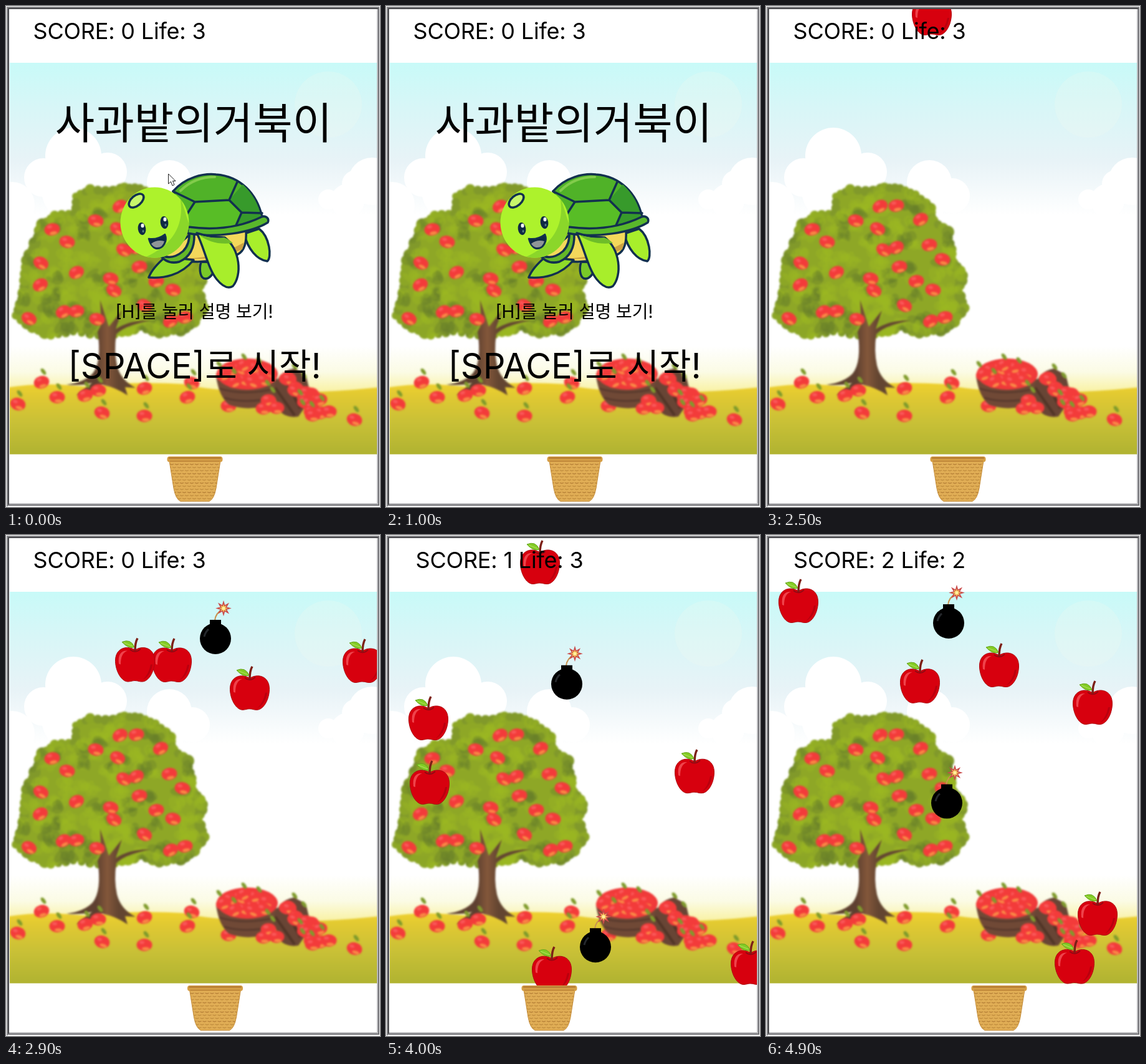
These frames come from a looping animation (600x803 px, 5000 ms). An HTML page with a canvas:

```html
<!DOCTYPE html>
<html lang="ko">
<head>
<meta charset="utf-8">
<title>사과밭의거북이</title>
<style>
html, body { margin: 0; width: 100%; height: 100%; overflow: hidden; background: #fff; }
canvas, svg { position: absolute; left: 0; top: 0; width: 600px; height: 803px; }
text { font-family: Inter, "Noto Sans CJK KR", "Noto Sans CJK", sans-serif; text-anchor: middle; fill: #000; }
.big { font-size: 69px; }
.start { font-size: 56px; }
.small { font-size: 28px; }
#score { font-size: 36px; letter-spacing: -0.2px; }
</style>
</head>
<body>
<canvas id="stage" width="600" height="803"></canvas>
<svg viewBox="0 0 600 803">
  <text id="score" x="182" y="53"></text>
  <g id="title">
    <text class="big" x="301" y="213">사과밭의거북이</text>
    <text class="small" x="302" y="500">[H]를 눌러 설명 보기!</text>
  </g>
  <g id="help">
    <text class="big" x="302" y="242">게임설명!</text>
    <text class="small" x="302" y="449">방향키를 움직여 바구니에 사과를 담으세요!</text>
    <text class="small" x="302" y="489">실수로 폭탄을 담으면 LIFE가 깎여요!</text>
    <text class="small" x="302" y="530">거북이가 당신을 구해줄거예요!</text>
  </g>
  <text id="start" class="start" x="302.5" y="597">[SPACE]로 시작!</text>
</svg>
<script>
const LOOP = 5000, STEP = 100, HELP = 1400, PLAY = 2400;
const $ = id => document.getElementById(id);
const ctx = $('stage').getContext('2d');

// [ms, game ticks]: the game slows as it goes on
const TICKS = [[2500, 0], [3300, 47.25], [4000, 85.4], [5000, 127.8]];
const BASKET = [[2400, 303], [2500, 308], [3300, 363], [4000, 262], [4900, 374], [5000, 386]];
// draw, x, ms and y of a known place, speed per tick, ms when caught
const DROPS = [
  [apple, 266, 3300, 354, 8, 4100],
  [bomb, 336, 3300, 297, 8, 4200],
  [apple, 207, 3300, 448, 12],
  [apple, 572, 3300, 544, 16],
  [apple, 391, 3300, 635, 18, 3400],
  [bomb, 290, 3300, -10, 5],
  [apple, 495, 3300, 38, 8],
  [apple, 68, 4000, 258, 15],
  [apple, 70, 4000, 361, 14],
  [apple, 585, 4000, 650, 20],
  [apple, 247, 4000, 8, 5],
  [apple, 52, 4900, 70, 8],
  [bomb, 293, 4900, 83, 8],
  [apple, 374, 4900, 173, 10],
  [apple, 524, 4900, 233, 11],
  [apple, 532, 4900, 571, 18]
];

function track(keys, t) {
  if (t >= PLAY && t < keys[0][0]) {
    const [a, b] = keys;
    return a[1] + (t - a[0]) * (b[1] - a[1]) / (b[0] - a[0]);
  }
  if (t <= keys[0][0]) return keys[0][1];
  const i = keys.findIndex(k => k[0] >= t), a = keys[i - 1], b = keys[i];
  return a[1] + (t - a[0]) * (b[1] - a[1]) / (b[0] - a[0]);
}

function seeded(s) {
  return () => (s = (s * 16807) % 2147483647) / 2147483647;
}

function layer(draw) {
  const c = document.createElement('canvas');
  c.width = 600; c.height = 803;
  draw(c.getContext('2d'));
  return c;
}

function oval(g, x, y, rx, ry, fill, rot = 0) {
  g.fillStyle = fill;
  g.beginPath();
  g.ellipse(x, y, rx, ry, rot, 0, 7);
  g.fill();
}

function shape(g, d, fill, line, width) {
  const p = new Path2D(d);
  if (fill) { g.fillStyle = fill; g.fill(p); }
  if (line) { g.strokeStyle = line; g.lineWidth = width; g.stroke(p); }
}

function fade(g, y0, y1, ...stops) {
  const f = g.createLinearGradient(0, y0, 0, y1);
  stops.forEach(([at, c]) => f.addColorStop(at, c));
  return f;
}

function fruit(g, x, y, tilt = 0) {
  oval(g, x, y, 12.5, 10, '#f33b3a', tilt);
  oval(g, x + 2, y + 6, 6, 2.5, '#f98a45', tilt);
  oval(g, x - 4, y - 4, 4, 2.5, '#f9585a', tilt);
}

function leaf(g, x, y) {
  oval(g, x, y, 6, 3, '#7f9a2c', 0.9);
}

const EDGE = [[112, 305], [135, 294], [172, 298], [190, 291], [215, 292], [240, 302], [264, 324], [268, 344], [292, 362],
  [297, 390], [300, 412], [316, 432], [308, 456], [318, 484], [302, 506], [280, 520], [246, 524], [215, 514], [186, 524],
  [148, 528], [108, 522], [72, 528], [42, 516], [16, 496], [27, 470], [30, 440], [33, 408], [46, 380], [58, 350], [78, 336], [112, 333]];
const TREE_FRUIT = [[183, 321], [209, 320], [144, 344], [179, 357], [248, 342], [74, 358], [98, 378], [189, 391], [209, 387],
  [262, 383], [283, 406], [56, 412], [113, 427], [214, 418], [168, 437], [173, 456], [55, 447], [241, 441], [268, 455],
  [37, 501], [92, 490], [113, 489], [146, 502], [222, 480], [264, 505], [287, 499]];
const FALLEN = [[57, 603], [82, 627], [19, 638], [127, 624], [148, 616], [154, 652], [222, 613], [222, 657], [298, 604], [291, 627], [357, 641], [559, 663]];

function tree(g) {
  const rnd = seeded(77);
  g.fillStyle = '#8ea726';
  g.beginPath();
  EDGE.forEach(p => g.lineTo(...p));
  g.fill();
  EDGE.forEach(([x, y], i) => {
    const [u, v] = EDGE[(i + 1) % EDGE.length];
    for (let k = 0; k < 3; k++) {
      const m = k / 3, r = 6 + rnd() * 4;
      oval(g, x + (u - x) * m, y + (v - y) * m, r, r, rnd() < 0.5 ? '#8ca626' : '#81992a');
    }
  });
  g.globalCompositeOperation = 'source-atop';
  for (let i = 0; i < 150; i++) {
    const x = 15 + rnd() * 300, y = 290 + rnd() * 240;
    const dark = rnd() < 0.33;
    for (let k = 0; k < 4; k++)
      oval(g, x + rnd() * 20, y + rnd() * 14, 5 + rnd() * 8, 4 + rnd() * 5, dark ? 'rgba(103,125,40,.38)' : 'rgba(155,184,32,.38)', rnd() * 3);
  }
  g.globalCompositeOperation = 'source-over';
  const bark = g.createLinearGradient(145, 0, 180, 0);
  bark.addColorStop(0, '#5e4030');
  bark.addColorStop(0.5, '#83573a');
  bark.addColorStop(1, '#634531');
  shape(g, 'M147 522Q154 570 139 589Q126 603 97 607Q121 609 138 604L113 624Q143 619 154 607Q176 611 195 624L191 611L208 612Q184 600 178 576Q173 552 177 526Q190 512 232 504Q198 503 176 518L186 488L165 514L151 471L153 510Z', bark);
  TREE_FRUIT.forEach(([x, y], i) => fruit(g, x, y, (i % 4 - 1.5) * 0.32));
}

function pile(g) {
  const rnd = seeded(19);
  shape(g, 'M337 594Q342 627 358 639Q392 652 432 635L439 598Z', '#704936');
  shape(g, 'M342 613Q385 626 437 612M350 628Q388 639 434 626', null, '#593a2d', 3);
  oval(g, 387, 590, 49, 25, '#ef3939');
  for (let i = 0; i < 18; i++) {
    const a = i * 2.4, r = Math.sqrt(i / 18);
    fruit(g, 386 + 38 * r * Math.cos(a), 590 + 16 * r * Math.sin(a), rnd() - 0.5);
  }
  shape(g, 'M428 617Q436 585 462 581L481 591L490 628L469 658Q450 661 440 650Z', '#684535');
  shape(g, 'M432 612L463 656M444 591L472 645', null, '#503426', 4);
  for (let i = 0; i < 18; i++) {
    const m = i / 17;
    fruit(g, 460 + 48 * m + (rnd() - 0.5) * 28, 600 + 52 * m + (rnd() - 0.5) * 16, rnd() - 0.5);
  }
  [[413, 645], [421, 632], [434, 644], [492, 656], [518, 650]].forEach(p => fruit(g, ...p));
  [[342, 574], [366, 585], [382, 562], [406, 568], [420, 604], [428, 615], [463, 578], [478, 592], [472, 619], [476, 635], [491, 638], [507, 628]]
    .forEach(p => leaf(g, ...p));
}

const land = layer(g => {
  g.fillStyle = '#fff';
  g.fillRect(0, 0, 600, 803);
  g.save();
  g.beginPath();
  g.rect(6, 91, 589, 627.5);
  g.clip();
  g.fillStyle = fade(g, 91, 335, [0, '#c8faf8'], [0.3, '#d8f6f7'], [0.65, '#e8f3f7'], [1, '#ffffff']);
  g.fillRect(6, 91, 589, 245);
  oval(g, 517, 158, 54, 53, 'rgba(240,246,240,.25)');
  [[108, 240, 45], [60, 275, 31], [163, 266, 31], [10, 318, 36], [112, 294, 55], [262, 283, 36], [299, 304, 28], [250, 320, 36],
    [587, 281, 38], [561, 285, 22], [517, 310, 16], [548, 312, 27]]
    .forEach(([x, y, r]) => oval(g, x, y, r, r, '#fff'));
  g.fillStyle = fade(g, 545, 614, [0, '#ffffff'], [0.6, '#fbfbe5'], [1, '#f9f3ad']);
  g.fillRect(6, 545, 589, 75);
  g.filter = 'blur(1.5px)';
  shape(g, 'M0 612Q60 602 125 610Q210 601 285 606Q330 617 400 617Q490 623 600 611V730H0Z',
    fade(g, 604, 718, [0, '#efd02e'], [0.2, '#dfc832'], [0.55, '#c9c036'], [1, '#b0b331']));
  g.drawImage(layer(tree), 0, 0);
  g.drawImage(layer(h => {
    FALLEN.forEach(([x, y], i) => {
      leaf(h, x + 3, y - 17);
      fruit(h, x, y, (i % 3 - 1) * 0.3);
    });
    pile(h);
  }), 0, 0);
  g.restore();
});

function apple(g, x, y) {
  g.save();
  g.translate(x, y);
  shape(g, 'M0 20C-11 12-32 15-31.500 38C-31 55-21 71-11 70.500C-5 70-4 69 0 69C5 69 7 71 12 70.500C22 70 31 55 31.500 38C32 15 11 12 0 20Z', '#d7000e', '#ad0711', 1);
  shape(g, 'M-26 42C-28 27-22 20-12 21C-20 24-23 31-23 43Z', '#ef434b');
  shape(g, 'M28 43Q26 60 12 68Q22 59 25 43Z', '#b9000e');
  shape(g, 'M-8 19Q0 26 9 18', null, '#940812', 2);
  shape(g, 'M0 21Q0 8 4 1', null, '#7d2017', 3.5);
  shape(g, 'M-1 15Q-10 19-21 7Q-7 1-1 15Z', '#83cc24', '#65a51d', 1);
  shape(g, 'M-18 8L-3 14', null, '#b4df66', 1);
  g.restore();
}

function bomb(g, x, y) {
  g.save();
  g.translate(x, y);
  shape(g, 'M-1 29Q0 17 13 10', null, '#c89450', 2);
  let star = '';
  for (let i = 0; i < 16; i++) {
    const a = i * Math.PI / 8, r = i % 2 ? 4.5 : 10;
    star += (i ? 'L' : 'M') + (13 + r * Math.cos(a)) + ' ' + (9.5 + r * Math.sin(a));
  }
  shape(g, star + 'Z', '#f3c55b', '#c94a4b', 1.6);
  oval(g, 13, 9.5, 2.5, 2.5, '#fff0a0');
  g.fillStyle = '#000';
  g.fillRect(-9, 28, 18, 12);
  oval(g, 0, 58, 25, 25, '#000');
  shape(g, 'M-18 55Q-16 47-11 43', null, '#25282c', 3);
  g.restore();
}

function turtle(g, x, y, size) {
  const ink = '#12304f', lime = '#a8ee2b';
  g.save();
  g.translate(x, y);
  g.scale(size, size);
  g.translate(-303, -360);
  g.lineJoin = g.lineCap = 'round';
  const part = (d, fill, w = 3.5) => shape(g, d, fill, ink, w);
  part('M313 410C309 424 312 438 321 437C330 436 335 424 339 411Z', '#79c928');
  part('M382 365C388 390 403 407 419 409C427 403 423 370 406 357Z', lime);
  part('M252 402Q315 420 372 398Q387 390 385 360L298 364Z', '#f3d85b');
  shape(g, 'M263 401Q321 413 382 379L379 390Q323 414 263 401Z', '#cda342');
  part('M256 402C244 412 234 422 229 435C252 437 281 432 301 407Z', '#8fdb29');
  part('M246 398Q265 409 284 393Q295 382 294 363L302 366Q303 399 278 410Q258 415 246 398Z', '#64b728');
  part('M268 297C288 274 317 268 337 270C376 273 402 300 411 338Q351 362 291 360Z', '#50b228');
  shape(g, 'M380 286Q404 309 409 338L369 352L378 331L358 311Z', '#379a2b');
  shape(g, 'M303 314L358 311L378 331L367 353Q329 360 292 356L291 333Z', '#58bd26');
  shape(g, 'M280 296Q302 274 335 274', null, '#82cc4b', 4);
  shape(g, 'M268 297L303 314L358 311L371 282M303 314L290 334M358 311L378 331L411 332M378 331L368 354', null, ink, 3.5);
  part('M410 338C417 335 423 341 420 347C394 363 336 373 291 364L292 354Q359 363 410 338Z', '#59b72b');
  part('M306 364C318 387 324 421 338 438C347 449 356 454 364 449C379 431 376 391 351 371Q329 371 306 364Z', lime);
  shape(g, 'M310 367Q331 384 364 380Q358 374 350 371Q329 373 310 367Z', '#6ebd29');
  g.beginPath();
  g.ellipse(238.5, 347, 55, 56.5, 0, 0, 7);
  g.fillStyle = '#adf22c';
  g.fill();
  g.save();
  g.clip();
  shape(g, 'M278 300Q294 370 225 402L265 410L300 370Z', '#8bd62a');
  oval(g, 209, 312, 14, 8, '#c7f66b', -0.7);
  g.restore();
  g.strokeStyle = ink;
  g.lineWidth = 3.5;
  g.stroke();
  [[218, 357], [254, 347]].forEach(([u, v]) => {
    oval(g, u, v, 6.3, 10, '#102945', -0.15);
    oval(g, u + 1, v - 5, 2.5, 3.3, '#fff');
    oval(g, u + 2, v + 4, 1.5, 2, '#547e82');
  });
  part('M229 373Q243 375 255 366C260 377 252 389 242 389Q233 388 229 373Z', '#102945', 2.5);
  shape(g, 'M233 381Q242 374 254 377Q251 388 241 387Q236 386 233 381Z', '#8f9698');
  g.restore();
}

function basket(g, x) {
  g.save();
  g.translate(x, 722);
  const body = new Path2D('M-41 7H41L34 51Q31 68 23 72H-23Q-31 68-34 51Z');
  g.fillStyle = '#e0ad55';
  g.fill(body);
  g.save();
  g.clip(body);
  g.lineWidth = 1.4;
  for (let r = 0; r < 13; r++)
    for (let k = -6; k < 7; k++) {
      const u = k * 8 + (r % 2) * 4, v = 12 + r * 5;
      shape(g, `M${u} ${v}q3 2 6 0`, null, r % 3 ? '#bf8b3c' : '#b47d35', 1.3);
    }
  g.restore();
  shape(g, body, null, '#c58e3c', 1);
  g.fillStyle = '#d59e45';
  g.beginPath();
  g.roundRect(-44.5, 0, 89, 9, 4);
  g.fill();
  shape(g, 'M-42 2.500H42', null, '#b17732', 2);
  shape(g, 'M-40 7.500H40', null, '#b47b35', 1);
  g.restore();
}

function border(g) {
  const bar = (c, ...r) => { g.fillStyle = c; g.fillRect(...r); };
  bar('#8c8c8f', 1, 1, 598, 2);
  bar('#8c8c8f', 1, 1, 2, 801);
  bar('#48484c', 3, 3, 594, 2);
  bar('#48484c', 3, 3, 2, 796);
  bar('#b5b5b8', 595, 5, 2, 794);
  bar('#727276', 597, 3, 2, 798);
  bar('#b5b5b8', 5, 797, 592, 2);
  bar('#727276', 3, 799, 596, 2);
}

function draw(t) {
  const g = ctx, play = t >= PLAY, help = !play && t >= HELP, title = t < HELP;
  g.drawImage(land, 0, 0);
  g.save();
  g.beginPath();
  g.rect(5, 5, 590.5, 792);
  g.clip();
  if (title) turtle(g, 303, 360, 1);
  if (help) {
    bomb(g, 203, 303);
    apple(g, 303, 314);
    turtle(g, 403, 357, 0.28);
  }
  if (play) {
    const now = track(TICKS, t);
    for (const [kind, x, at, y, v, end = LOOP] of DROPS)
      if (t < end) kind(g, x, y + v * (now - track(TICKS, at)));
  }
  basket(g, track(BASKET, t));
  g.restore();
  border(g);
  if (t < 500) shape(g, 'M260.500 269V285L264.500 281.500L267 288L270 286.500L267.500 280.500H272Z', '#fff', '#222', 1);

  const score = t < 3400 ? 0 : t < 4100 ? 1 : 2, life = t < 4200 ? 3 : 2;
  $('score').textContent = `SCORE: ${score} Life: ${life}`;
  $('title').style.display = title ? '' : 'none';
  $('help').style.display = help ? '' : 'none';
  $('start').style.display = play ? 'none' : '';
}

const begin = performance.now();
function tick() {
  const t = Math.max(0, performance.now() - begin) % LOOP;
  draw(Math.floor(t / STEP) * STEP);
  requestAnimationFrame(tick);
}
tick();
</script>
</body>
</html>
```
